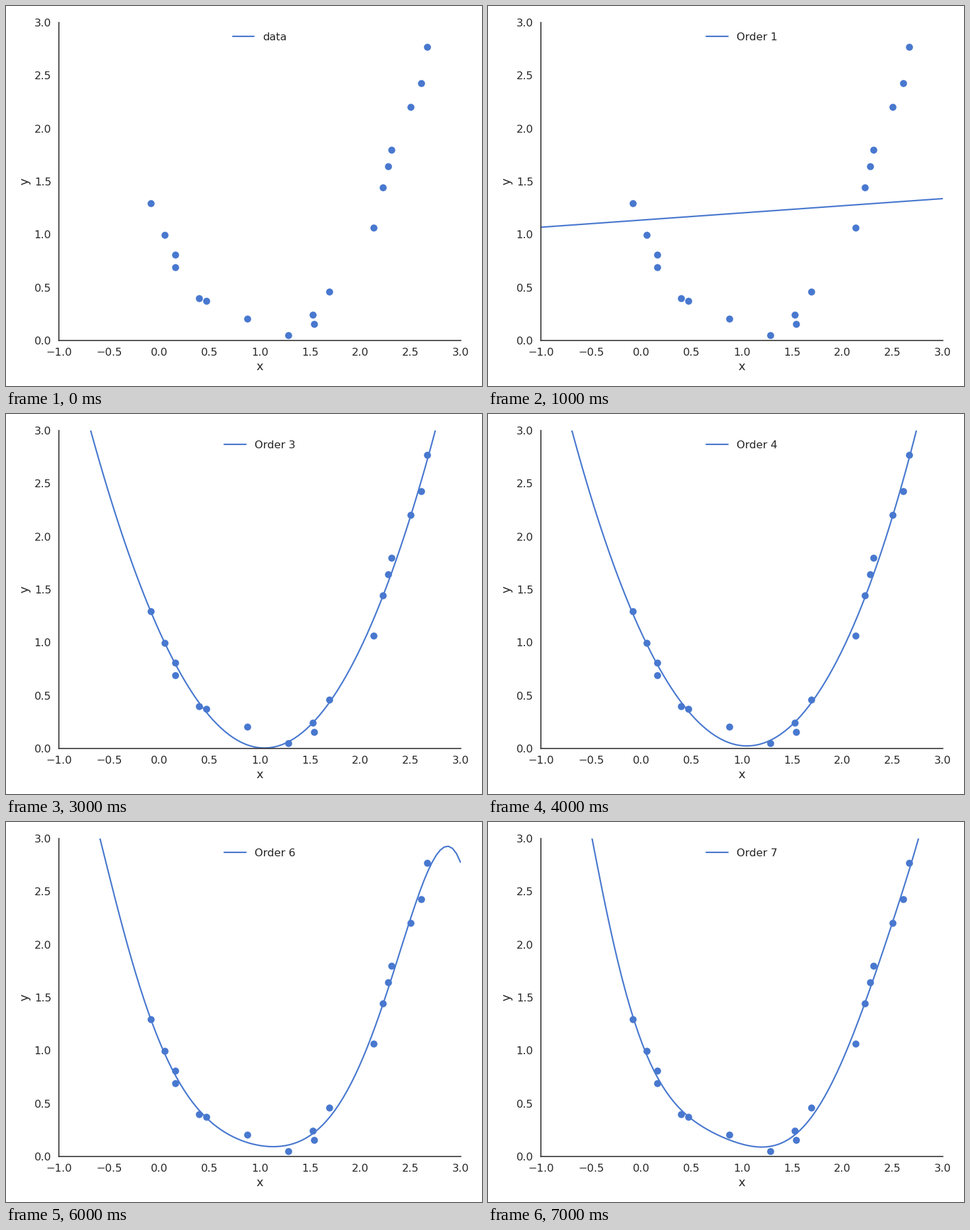
Animation of 720 by 576 pixels, one loop 8 s. Source, as a matplotlib script:

```python
import numpy as np
import matplotlib.pyplot as plt
from matplotlib.animation import FuncAnimation

W, H, DPI = 720, 576, 90
LEFT, RIGHT, TOP, BOTTOM = 80, 687.5, 25, 507
BLUE, DARK = "#4878cf", "#262626"

plt.rcParams.update({
    "font.family": "DejaVu Sans", "font.size": 13,
    "axes.labelsize": 14.3, "axes.labelpad": 4, "axes.linewidth": 1.25,
    "text.color": DARK, "axes.labelcolor": DARK, "axes.edgecolor": DARK,
    "xtick.labelcolor": DARK, "ytick.labelcolor": DARK,
    "lines.solid_capstyle": "round",
})

# Noisy samples of a parabola; the first lies above the visible range.
xs, ys = np.array([
    (-1, 4.195), (-.083, 1.294), (.055, .994), (.162, .809), (.162, .689),
    (.399, .396), (.469, .371), (.877, .203), (1.285, .047), (1.529, .241),
    (1.543, .153), (1.694, .458), (2.137, 1.062), (2.227, 1.441),
    (2.280, 1.643), (2.313, 1.797), (2.506, 2.203), (2.609, 2.425),
    (2.668, 2.768),
]).T
grid = np.linspace(-1, 3, 100)

fig = plt.figure(figsize=(W / DPI, H / DPI), dpi=DPI, facecolor="white")
ax = fig.add_axes([LEFT / W, 1 - BOTTOM / H,
                   (RIGHT - LEFT) / W, (BOTTOM - TOP) / H])
ax.set(xlim=(-1, 3), ylim=(0, 3), xlabel="x", ylabel="y",
       xticks=np.arange(-1, 3.1, .5), yticks=np.arange(0, 3.1, .5))
ax.tick_params(length=0, pad=9.1)
ax.spines[["top", "right"]].set_visible(False)

ax.plot(xs, ys, "o", color=BLUE, markersize=8.5, markeredgewidth=0)
curve, = ax.plot([], [], color=BLUE, linewidth=1.75, label="data")
legend = ax.legend(handles=[curve], loc="upper center", frameon=False)
caption = legend.get_texts()[0]


def draw(order):
    """Show the bare samples first, then the fit of each higher order."""
    if order == 0:
        curve.set_data([], [])
        caption.set_text("data")
    else:
        curve.set_data(grid, np.polyval(np.polyfit(xs, ys, order), grid))
        caption.set_text(f"Order {order}")
    return curve, caption


anim = FuncAnimation(fig, draw, frames=8, interval=1000, repeat=True,
                     repeat_delay=0, blit=False)
plt.show()
```
